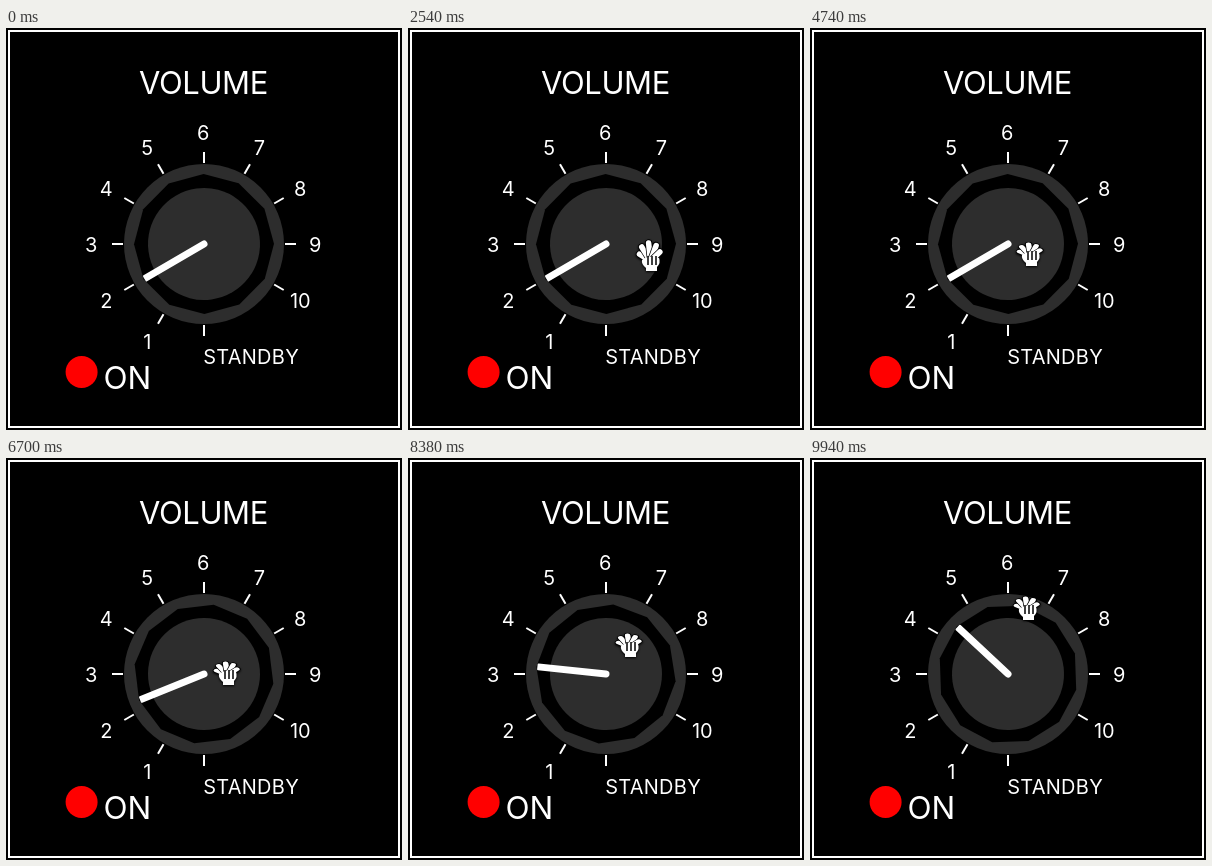
An HTML page that plays this animation: 396 by 402 pixels, repeating every 9960 ms.

```html
<!DOCTYPE html>
<html lang="en">
<head>
<meta charset="utf-8">
<title>Volume knob</title>
<style>
html, body { margin: 0; height: 100%; overflow: hidden; background: #000; }
svg { display: block; width: 396px; height: 402px; }
text { font: 20px Inter, sans-serif; fill: #fff; }
#hand { filter: drop-shadow(0 0 .7px #000) drop-shadow(0 1px 1px #000); }
</style>
</head>
<body>
<svg viewBox="0 0 396 402">
  <rect x="3" y="3" width="390" height="396" fill="none" stroke="#fff" stroke-width="2"/>
  <text x="197.5" y="66" text-anchor="middle" style="font-size:31px;letter-spacing:-.4px">VOLUME</text>
  <g id="scale" stroke="#fff" stroke-width="2"></g>
  <text x="197.3" y="336" style="letter-spacing:.25px">STANDBY</text>
  <circle cx="75.6" cy="344" r="16" fill="red"/>
  <text x="97.5" y="360.5" style="font-size:31.5px">ON</text>
  <circle cx="198" cy="216" r="80" fill="#2d2d2d"/>
  <g id="knob">
    <polygon id="rim"/>
    <circle r="56" fill="#2d2d2d"/>
    <path d="M0-3.5H68q1 0 1 1v5q0 1-1 1H0a3.5 3.5 0 0 1 0-7z" fill="#fff"/>
  </g>
  <path id="arrow" d="M0 0V27L6.5 21 11.3 32.3 16 30.3 11.3 19.5H19.5z" stroke="#fff" stroke-width="2"/>
  <g id="hand">
    <g id="fingers" stroke-linecap="round"></g>
    <path d="M-8 5Q0-1 9 3 11 8 7 12V16H-4V13Q-9 9-8 5z" fill="#fff"/>
    <path d="M-2 1v9M2 1v9M6 1v9" stroke="#000" stroke-width="1.5"/>
  </g>
</svg>
<script>
const LOOP = 9960, ENTER = 960, PRESS = 4740;
const $ = id => document.getElementById(id);
const polar = (deg, r, x = 0, y = 0) =>
  [x + r * Math.cos(deg * Math.PI / 180), y + r * Math.sin(deg * Math.PI / 180)];

// Turning points of the pointer: time, x, y
const path = [
  [ENTER, 388, 305], [1940, 293, 235], [2540, 242, 227], [2940, 224, 223],
  [3360, 220, 222], [6300, 220, 222], [7020, 221, 203], [7440, 221, 203],
  [8500, 221, 180.5], [LOOP, 217, 146]
];

function pointerAt(t) {
  const i = Math.max(1, path.findIndex(p => p[0] > t));
  const [t0, x0, y0] = path[i - 1], [t1, x1, y1] = path[i];
  const k = Math.max(0, (t - t0) / (t1 - t0));
  return [Math.round(x0 + (x1 - x0) * k), Math.round(y0 + (y1 - y0) * k)];
}

for (let i = 0; i < 11; i++) {
  const deg = 90 + 30 * i;
  const [x, y] = polar(deg, 112, 197.3, 217);
  $('scale').innerHTML += `<path d="M${polar(deg, 81, 198, 216)}L${polar(deg, 92, 198, 216)}"/>` +
    (i ? `<text x="${x}" y="${y + 7}" text-anchor="middle" stroke="none">${i}</text>` : '');
}
$('rim').setAttribute('points', Array.from({ length: 12 }, (_, i) => polar(30 * i, 70)).join(' '));

// Five fingers fan out from the palm, the middle one longest
for (let i = 0; i < 5; i++) {
  const d = `M0 0L${polar(26 * i - 148, 13 + 5 * Math.sin(Math.PI * i / 4))}`;
  $('fingers').innerHTML += `<path d="${d}" stroke="#000" stroke-width="7"/>` +
    `<path d="${d}" stroke="#fff" stroke-width="5.5"/>`;
}

const place = (id, transform) => $(id).setAttribute('transform', transform);
const show = (id, on) => $(id).style.display = on ? '' : 'none';

function draw(now) {
  const t = now % LOOP, [x, y] = pointerAt(t);
  const overKnob = Math.hypot(x - 198, y - 216) < 80;
  const turn = t < PRESS ? 0 : Math.max(0, 219.3 - y);
  place('knob', `translate(198 216) rotate(${149.7 + turn})`);
  place('arrow', `translate(${x} ${y})`);
  place('hand', `translate(${x} ${y})`);
  place('fingers', `translate(.5 6) scale(1 ${t < PRESS ? 1 : .65})`);
  show('arrow', t >= ENTER && !overKnob);
  show('hand', t >= ENTER && overKnob);
  requestAnimationFrame(draw);
}
requestAnimationFrame(draw);
</script>
</body>
</html>
```
